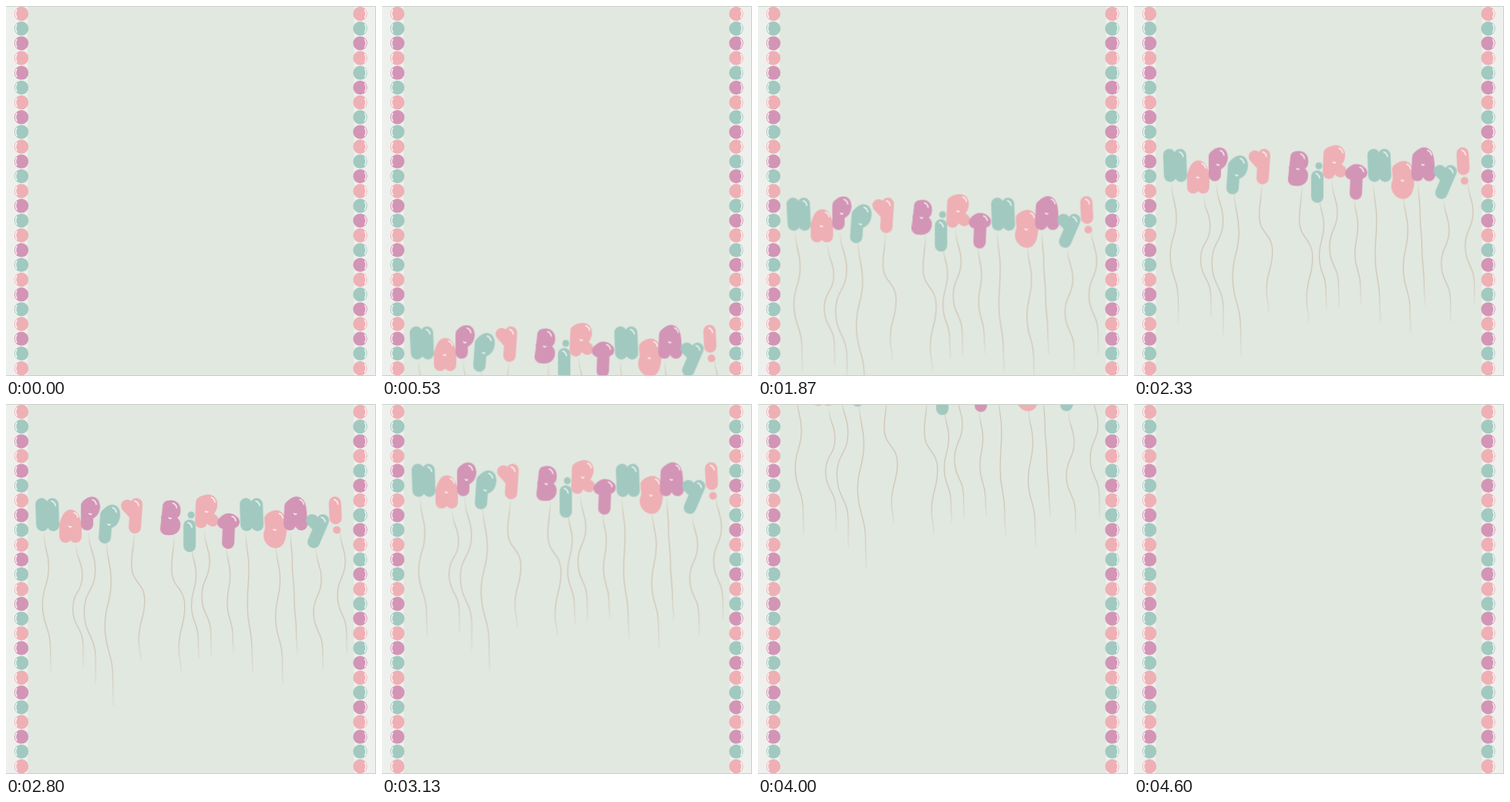
Animation, 480 px wide and 480 px high, one loop 4670 ms. Source, as an HTML page:

```html
<!DOCTYPE html>
<html lang="en">
<head>
<meta charset="utf-8">
<title>Happy Birthday balloons</title>
<style>
html, body { margin: 0; width: 100%; height: 100%; overflow: hidden; background: #e1e8e0; }
svg { display: block; width: 100%; height: 100%; }
.string { fill: none; stroke: url(#fade); stroke-width: 1.1; }
.letter { stroke-width: 16; stroke-linecap: round; stroke-linejoin: round; }
.shine { fill: none; stroke: #fff; stroke-width: 1.5; stroke-linecap: round; opacity: .85; }
</style>
</head>
<body>
<svg viewBox="0 0 480 480">
  <defs>
    <linearGradient id="fade" x1="0" y1="0" x2="0" y2="1">
      <stop offset="0" stop-color="#cdbfac" stop-opacity=".1"/>
      <stop offset=".12" stop-color="#cdbfac"/>
      <stop offset=".75" stop-color="#cdbfac"/>
      <stop offset="1" stop-color="#cdbfac" stop-opacity=".25"/>
    </linearGradient>
  </defs>
  <rect width="480" height="480" fill="#e1e8e0"/>
  <g id="balloons"></g>
  <g id="left"><rect width="28" height="480" fill="#eef0ed"/></g>
  <g id="right" transform="rotate(180 239.75 240)"><rect width="28" height="480" fill="#eef0ed"/></g>
  <path d="M0 .5H479.5V480M0 479.5H480" fill="none" stroke="#cbd0ca"/>
</svg>
<script>
const PINK = '#eeb0b4', TEAL = '#a1c9c0', PLUM = '#d395b5';
const LOOP = 4670, FRAMES = 70, FRAME = 1000 / 15;

// Centre lines of the bubble letters, inflated by a thick round stroke
const SHAPES = {
  H: 'M8 9L9 36M22 9L23 36M9 22H22',
  a: 'M8 35V20Q15-4 21 20V35',
  P: 'M8 36V12Q16 4 17 13Q16 22 9 22',
  p: 'M8 43L10 14Q20 3 20 14Q19 23 11 24',
  Y: 'M8 10L18 21M20 8L18 38',
  B: 'M8 37L11 9Q20 7 18 17L9 23L18 31Q19 40 8 38',
  i: 'M9 19V45',
  R: 'M8 35L9 10Q22 3 21 14Q19 22 10 23L23 33',
  T: 'M8 13Q15 5 21 12M15 14L14 39',
  D: 'M10 12Q24 2 23 26Q22 46 13 41Q6 36 11 26Z',
  A: 'M8 35L9 12Q21-1 22 20L23 35',
  y: 'M8 9L17 18M22 9L10 37',
  '!': 'M9.5 10L10.5 30'
};
const DOTS = { i: [11, 5, 4.5], '!': [12, 45.5, 5] };

// Letter, x, y, knot, string length, string sway
const LETTERS = [
  ['H', 38, 121, 11, 180, 5], ['a', 69, 137, 22, 158, 7], ['P', 97, 120, 10, 198, 8],
  ['p', 120, 130, 10, 215, 5], ['Y', 149, 122, 17, 166, -7], ['B', 200, 124, 18, 177, -7],
  ['i', 229, 139, 12, 146, 4], ['R', 245, 118, 12, 163, 6], ['T', 274, 141, 12, 137, 3],
  ['H', 303, 121, 8, 182, 2], ['D', 333, 137, 17, 179, 4], ['A', 360, 121, 9, 158, 0],
  ['y', 389, 142, 13, 158, 6], ['!', 417, 118, 16, 161, 6]
];
const BENDS = [[0, 0], [.25, .8], [.52, -1.3], [.83, .2], [1, 0]];
const LEAN = 9;

// Time and height of the balloons
const RISE = [[0, 365], [530, 294], [1200, 217], [2800, 0], [3730, -124]];

function add(parent, tag, attrs) {
  const el = document.createElementNS('http://www.w3.org/2000/svg', tag);
  for (const k in attrs) el.setAttribute(k, attrs[k]);
  return parent.appendChild(el);
}

function stringPath(length, sway) {
  const points = BENDS.map(([p, side]) => [LEAN * p + sway * side, 46 + length * p]);
  return points.map(([x, y], i) => {
    if (!i) return `M${x} ${y}`;
    const [px, py] = points[i - 1], mid = (py + y) / 2;
    return `C${px} ${mid} ${x} ${mid} ${x} ${y}`;
  }).join('');
}

function beads(id) {
  const g = document.getElementById(id);
  for (let i = 0; i < 25; i++) {
    const fill = (i < 3 ? [PINK, TEAL, PLUM] : [PINK, PLUM, TEAL])[i % 3];
    const y = 10 + i * 460 / 24;
    add(g, 'circle', { cx: 20, cy: y, r: 9.2, fill });
    add(g, 'path', { class: 'shine', d: `M14 ${y - 5}Q11 ${y} 14 ${y + 5}` });
  }
}

function balloon([key, x, y, knot, length, sway], i) {
  const fill = [TEAL, PINK, PLUM][i % 3];
  const g = add(group, 'g', { transform: `translate(${x} ${y})` });
  add(g, 'path', { class: 'string', d: stringPath(length, sway), transform: `translate(${knot})` });
  const body = add(g, 'path', { class: 'letter', d: SHAPES[key], fill, stroke: fill });
  if (DOTS[key]) {
    const [cx, cy, r] = DOTS[key];
    add(g, 'circle', { cx, cy, r, fill });
  }
  const box = body.getBBox();
  add(g, 'path', { class: 'shine', d: `M${box.x + box.width - 2} ${box.y - 4}q4 1 5 6` });
  if ('aPpBRDA'.includes(key))
    add(g, 'path', { class: 'shine', d: `M${box.x + box.width / 2 - 2} ${box.y + box.height / 2}q1.5 2 3 .5` });
}

// Steady rise, speeding up as the balloons leave the stage
function height(t) {
  const i = Math.max(1, RISE.findIndex(([time]) => time > t));
  const [end, low] = RISE[RISE.length - 1];
  if (t >= end) return low - .135 * (t - end) - .000237 * (t - end) ** 2;
  const [t0, y0] = RISE[i - 1], [t1, y1] = RISE[i];
  return y0 + (y1 - y0) * (t - t0) / (t1 - t0);
}

const group = document.getElementById('balloons');
beads('left');
beads('right');
LETTERS.forEach(balloon);

// Held steps, with a slow drift to the right
const steps = Array.from({ length: FRAMES + 1 }, (_, n) => {
  const t = Math.min(n, FRAMES - 1) * FRAME;
  return {
    offset: n < FRAMES ? Math.max(0, n * FRAME - 4) / LOOP : 1,
    transform: `translate(${(t - 2600) * .0008}px, ${height(t)}px)`,
    easing: 'step-end'
  };
});
group.animate(steps, { duration: LOOP, iterations: Infinity });
</script>
</body>
</html>
```
